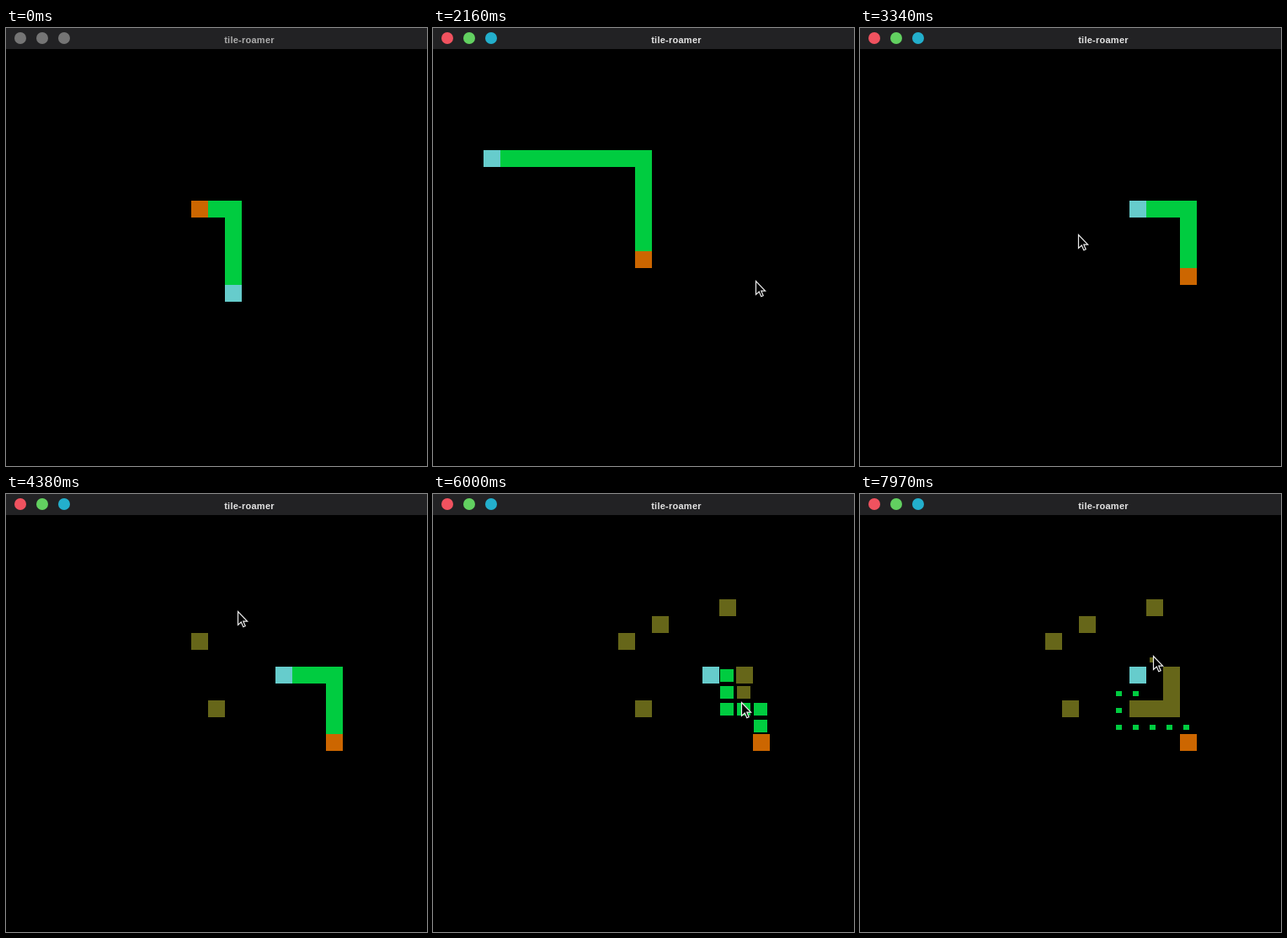
An HTML page with a canvas for the animation above (8000 ms loop, 500 px wide and 520 px high).

```html
<!DOCTYPE html>
<html lang="en">
<head>
<meta charset="utf-8">
<title>tile-roamer</title>
<style>
  html, body { margin: 0; width: 100%; height: 100%; overflow: hidden; background: #000; }
  canvas, svg { position: absolute; left: 0; top: 0; display: block; }
  text { font: bold 11px "Liberation Sans", Arial, sans-serif; letter-spacing: .25px; fill: #e4e4e4; }
  .idle text { fill: #acacac; }
  .idle circle { fill: #757575; }
</style>
</head>
<body>
<canvas id="stage" width="500" height="520"></canvas>
<svg id="bar" width="500" height="25">
  <rect width="500" height="25" fill="#222224"/>
  <circle cx="17" cy="12" r="7" fill="#f0525f"/>
  <circle cx="43" cy="12" r="7" fill="#62d060"/>
  <circle cx="69" cy="12" r="7" fill="#23afcc"/>
  <text x="289" y="18" text-anchor="middle">tile-roamer</text>
</svg>
<script>
const LOOP = 8000, GROW = 200, CELL = 20, TOP = 5, COLS = 25, ROWS = 26;
const FOCUS = 840, LEAD = 100, LINGER = 30;
const COLOR = { wall: '#666619', path: '#00cc40', start: '#66cccc', goal: '#cc6600' };
const ctx = document.getElementById('stage').getContext('2d');
const bar = document.getElementById('bar');

// What the pointer does: time, action, tip x, tip y.
const actions = [
  [-1000, 'start', 270, 315], [-1000, 'goal', 230, 215],
  [130, 'move', 505, 318],
  [840, 'goal', 252, 278], [1690, 'start', 67, 152],
  [2250, 'goal', 383, 300], [2800, 'start', 330, 214],
  [3430, 'move', 259, 245],
  [3660, 'wall', 253, 249], [4120, 'wall', 230, 172],
  [4450, 'move', 275, 139],
  [4680, 'wall', 268, 152], [5140, 'wall', 350, 134],
  [5500, 'wall', 370, 213], [5840, 'wall', 367, 236],
  [6090, 'wall', 366, 247], [6500, 'wall', 349, 255], [7090, 'wall', 333, 257],
  [7450, 'move', 262, 230],
  [7904, 'wall', 348, 192]
].map(([at, kind, x, y]) => ({
  at, kind, x, y, c: Math.floor(x / CELL), r: Math.floor((y - TOP) / CELL)
}));

const clicks = actions.filter(a => a.kind !== 'move');
const stops = actions.filter(a => a.at > 0);
const arrow = new Path2D('M.5 .5V16.5L4.3 13L6.8 18.8L9.2 17.8L6.8 12.2H11.6Z');

const same = (a, b) => a.c === b.c && a.r === b.r;
const inside = p => p.c >= 0 && p.c < COLS && p.r > 0 && p.r < ROWS;
// Right, up, down, left: the order in which equal steps are preferred.
const around = ({ c, r }) =>
  [{ c: c + 1, r }, { c, r: r - 1 }, { c, r: r + 1 }, { c: c - 1, r }].filter(inside);

// Shortest way between start and goal, without the two ends.
function findPath(start, goal, walls) {
  const key = p => p.r * COLS + p.c;
  const dist = new Map([[key(goal), 0]]);
  const queue = [goal];
  for (const p of queue) {
    for (const n of around(p)) {
      if (dist.has(key(n)) || walls.some(w => same(w, n))) continue;
      dist.set(key(n), dist.get(key(p)) + 1);
      queue.push(n);
    }
  }
  const path = [];
  for (let p = start; !same(p, goal);) {
    const left = dist.get(key(p)) - 1;
    p = around(p).find(n => dist.get(key(n)) === left);
    path.push(p);
  }
  return path.slice(0, -1);
}

// The board after each click.
const boards = clicks.map((click, i) => {
  const done = clicks.slice(0, i + 1);
  const latest = kind => done.filter(a => a.kind === kind).pop();
  const walls = done.filter(a => a.kind === 'wall');
  const start = latest('start'), goal = latest('goal');
  const path = start && goal ? findPath(start, goal, walls) : [];
  return { at: click.at, blocks: [...walls, start, goal].filter(Boolean), path };
});

// A block grows out of a point low and left of its middle.
function drawBlock({ c, r }, kind, age) {
  const size = CELL * Math.min(1, age / GROW), rest = CELL - size;
  const x0 = Math.round(rest * .31), x1 = Math.round(rest * .31 + size);
  const y0 = Math.round(rest * .69), y1 = Math.floor(rest * .69 + size + 1e-6);
  ctx.fillStyle = COLOR[kind];
  ctx.fillRect(c * CELL + x0, r * CELL + TOP + y0, x1 - x0, Math.max(0, y1 - y0));
}

// The pointer reaches each stop a little early and lingers after it.
function drawPointer(t) {
  const next = stops.findIndex(s => s.at + LINGER > t);
  if (next === 0) return;
  const to = next < 0 ? stops[stops.length - 1] : stops[next];
  const from = next < 0 ? to : stops[next - 1];
  const begin = from.at + LINGER, end = to.at - LEAD;
  const k = Math.min(1, Math.max(0, (t - begin) / (end - begin)));
  const e = k * k * (3 - 2 * k);
  ctx.save();
  ctx.translate(Math.round(from.x + (to.x - from.x) * e), Math.round(from.y + (to.y - from.y) * e));
  ctx.fillStyle = '#000';
  ctx.strokeStyle = '#ececec';
  ctx.lineWidth = 1.2;
  ctx.fill(arrow);
  ctx.stroke(arrow);
  ctx.restore();
}

function draw(t) {
  const board = boards.filter(b => b.at <= t).pop();
  ctx.fillStyle = '#000';
  ctx.fillRect(0, 0, 500, 520);
  for (const p of board.path) drawBlock(p, 'path', t - board.at);
  for (const b of board.blocks) drawBlock(b, b.kind, t - b.at);
  drawPointer(t);
  bar.classList.toggle('idle', t < FOCUS);
}

const begin = performance.now();
function tick(now) {
  draw(Math.max(0, now - begin) % LOOP);
  requestAnimationFrame(tick);
}
draw(0);
requestAnimationFrame(tick);
</script>
</body>
</html>
```
